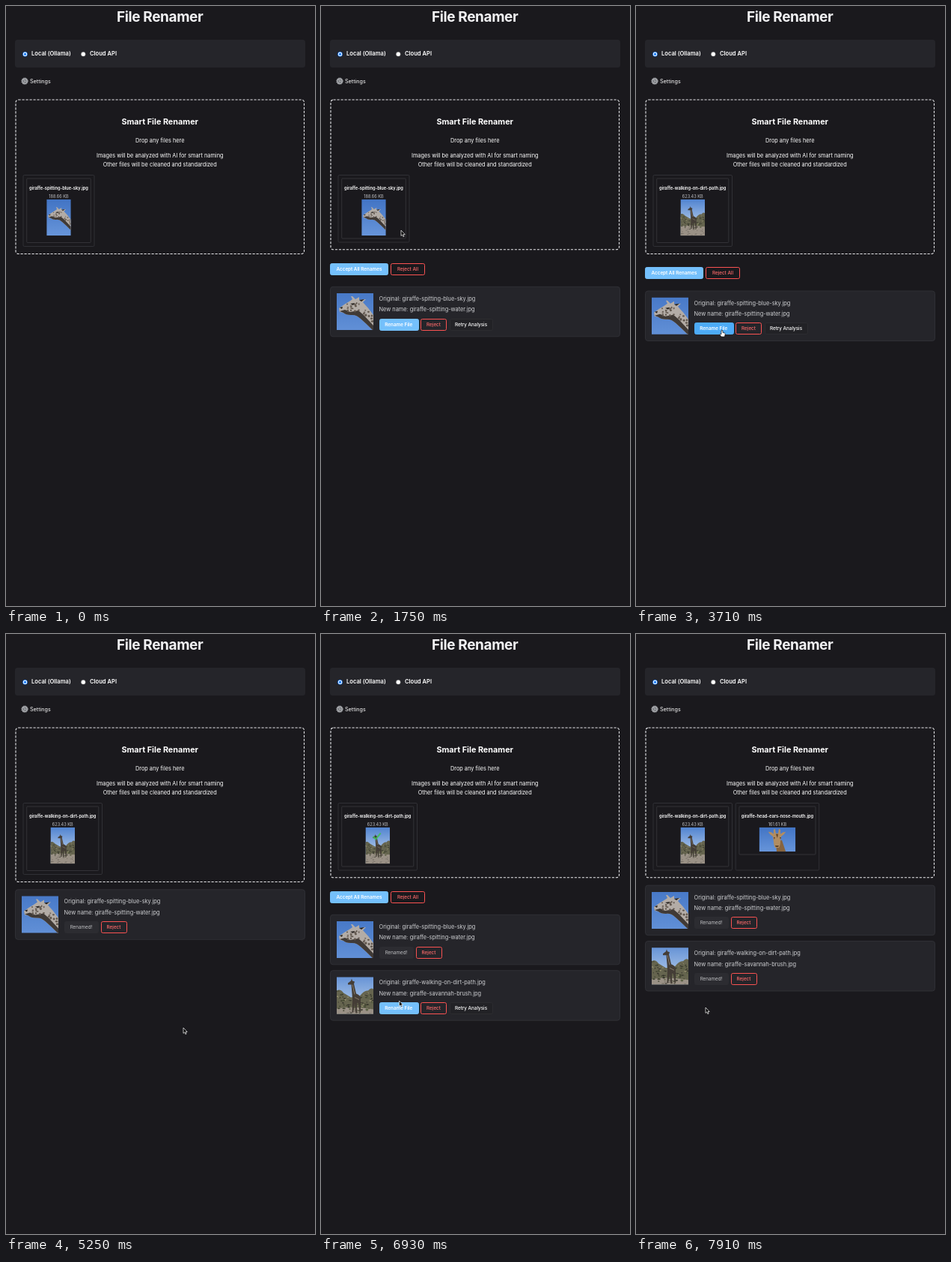
Write an HTML page that moves like this. It is 413 px wide and 800 px high and loops after 8 s.

```html
<!DOCTYPE html>
<html lang="en">
<head>
<meta charset="utf-8">
<title>File Renamer</title>
<style>
  html, body { margin: 0; width: 100%; height: 100%; overflow: hidden; background: #1a191d; }
  svg { display: block; }
  text { font-family: Inter, "Open Sans", sans-serif; }
</style>
</head>
<body>
<svg id="stage" width="100%" height="100%" viewBox="0 0 413 800" preserveAspectRatio="xMinYMin meet">
  <defs>
    <linearGradient id="sky" x1="0" y1="0" x2="0" y2="1">
      <stop offset="0" stop-color="#4274c4"/><stop offset="1" stop-color="#6795da"/>
    </linearGradient>
    <linearGradient id="haze" x1="0" y1="0" x2="0" y2="1">
      <stop offset="0" stop-color="#5083d0"/><stop offset=".55" stop-color="#9dbbe4"/>
    </linearGradient>

    <symbol id="profile" viewBox="0 0 49 73" preserveAspectRatio="xMidYMid slice">
      <rect width="49" height="73" fill="url(#sky)"/>
      <path d="M3 32 L10 27 Q17 23 21 20 L19 16 L21 16 L25 20 L30 17 L30 21 L39 20 L35 24 Q42 31 49 41 V62 Q40 53 32 46 Q26 40 19 41 Q12 41 9 38 L4 37Z" fill="#b3aca6"/>
      <path d="M4 36 L11 34 L18 37 L29 35 L36 41 L49 55 V62 Q40 53 32 46 Q26 40 19 41 Q12 41 9 38Z" fill="#403a36"/>
      <g id="spots" fill="#62584f"></g>
      <path d="M18 26 l6 -1 l-2 3z M4 31 l4 -1 l-1 3z M30 21 l7 -1 l-4 3z" fill="#25211e"/>
    </symbol>

    <symbol id="walker" viewBox="0 0 49 73" preserveAspectRatio="xMidYMid slice">
      <rect width="49" height="73" fill="url(#haze)"/>
      <path d="M0 30 Q5 27 9 33 Q14 36 19 39 L31 37 Q37 29 42 30 Q46 25 49 28 V73 H0Z" fill="#66654f"/>
      <path d="M0 54 Q20 50 49 55 V73 H0Z" fill="#9a9186"/>
      <g id="brush"></g>
      <path d="M15 20 L19 17 L20 14 L21 17 L24 18 L23 21 L26 34 Q32 36 32 41 L32 59 H30.5 L29 47 L27 47 L27 60 H25.5 L24 47 L22 59 H20.5 L21 40 L19.5 22 L15 22Z" fill="#443d36"/>
      <path d="M21 22 L24 35 M24 39 L30 42" stroke="#8d8070" stroke-width=".9" fill="none"/>
    </symbol>

    <symbol id="face" viewBox="0 0 48 32" preserveAspectRatio="xMidYMid slice">
      <rect width="48" height="32" fill="url(#sky)"/>
      <path d="M22 18 L30 17 L35 32 H23Z" fill="#86643f"/>
      <path d="M12 6 Q17 6 19 9 L19 3 L21 2 L22 8 L25 8 L26 2 L28 3 L28 9 Q31 6 35 6 Q33 10 29 12 L28 18 Q28 24 26 27 L21 27 Q19 23 19 18 L18 12 Q14 10 12 6Z" fill="#b18d62"/>
      <path d="M19 13 l2 0 l-1 3z M27 13 l2 0 l-1 3z M21 24 l5 0 l-1 2 l-3 0z M22 9 l3 0 l-1 5z" fill="#5e4328"/>
    </symbol>
  </defs>
  <g id="page"></g>
  <g id="scene"></g>
</svg>
<script>
const LOOP = 8000, STEP = 70;
const RED = '#fa5252', BLUE = '#74c0fc', BLUE_HOVER = '#4dabf7', PANEL = '#25252a';
const $ = id => document.getElementById(id);

const files = [
  { name: 'giraffe-spitting-blue-sky.jpg', next: 'giraffe-spitting-water.jpg', size: '188.66 KB',
    art: 'profile', cardW: 95, w: 32.5, h: 48.5,
    added: 0, done: 420, fade: [1050, 1470], hover: 2310, renamed: 3850, removed: 3570 },
  { name: 'giraffe-walking-on-dirt-path.jpg', next: 'giraffe-savannah-brush.jpg', size: '623.43 KB',
    art: 'walker', cardW: 105.5, w: 32.5, h: 48.5,
    added: 1820, done: 5950, fade: [6860, 7280], hover: 7280, renamed: 7630, removed: Infinity },
  { name: 'giraffe-head-ears-nose-mouth.jpg', size: '161.61 KB',
    art: 'face', cardW: 111.5, w: 48.5, h: 32.5,
    added: 7770, done: Infinity, queued: true, removed: Infinity }
];

// time, x, y of the pointer tip
const path = [
  [1470, -5, 420], [1820, 120, 285], [2170, 112, 447], [2310, 115, 432], [3850, 115, 432],
  [4340, 237, 525], [6440, 237, 525], [6930, 104.5, 489], [7280, 108, 493],
  [7630, 108, 493], [7910, 93, 498]
];

function rect(x, y, w, h, fill, stroke = 'none', r = 2, extra = '') {
  return `<rect x="${x}" y="${y}" width="${w}" height="${h}" rx="${r}" fill="${fill}" stroke="${stroke}" ${extra}/>`;
}
function text(str, x, y, size, fill = '#fff', weight = 400, anchor = 'start', extra = '') {
  return `<text x="${x}" y="${y}" font-size="${size}" fill="${fill}" font-weight="${weight}" text-anchor="${anchor}" ${extra}>${str}</text>`;
}
function circle(x, y, r, fill, extra = '') {
  return `<circle cx="${x}" cy="${y}" r="${r}" fill="${fill}" ${extra}/>`;
}
function photo(art, x, y, w, h) {
  return `<use href="#${art}" x="${x}" y="${y}" width="${w}" height="${h}"/>`;
}
// Outlines sit on half pixels so that they stay crisp.
function button(label, x, y, w, { fill = 'none', stroke = fill, color = '#fff', weight = 500 } = {}) {
  return rect(Math.round(x) + .5, Math.round(y) + .5, Math.round(w) - 1, 15, fill, stroke) +
    text(label, x + w / 2, Math.round(y) + 10.2, 6.3, color, weight, 'middle');
}
const primary = (label, x, y, w, hover) =>
  button(label, x, y, w, { fill: hover ? BLUE_HOVER : BLUE, weight: 600 });
const danger = (label, x, y, w) => button(label, x, y, w, { stroke: RED, color: '#ff6b6b' });

function random(seed) {
  return () => (seed = seed * 16807 % 2147483647) / 2147483647;
}
function dabs(n, seed, place) {
  const rnd = random(seed);
  return Array.from({ length: n }, () => place(rnd)).join('');
}

function drawStatic() {
  $('spots').innerHTML = dabs(28, 77, rnd => {
    const x = 14 + rnd() * 34, top = x < 32 ? 25 : 25 + (x - 32) * 1.1;
    return `<ellipse cx="${x}" cy="${top + rnd() * 11}" rx="${.8 + rnd()}" ry="${.6 + rnd()}"/>`;
  });
  const leaves = ['#3f422f', '#96906f', '#5a6044', '#33322a'];
  $('brush').innerHTML = dabs(110, 31, rnd => {
    const x = rnd() * 49, y = 29 + Math.abs(Math.sin(x / 49 * Math.PI)) * 8 + rnd() * 24;
    return `<ellipse cx="${x}" cy="${y}" rx="${.5 + rnd() * 1.5}" ry=".8" fill="${leaves[rnd() * 4 | 0]}"/>`;
  }) + dabs(30, 53, rnd =>
    `<ellipse cx="${rnd() * 49}" cy="${56 + rnd() * 16}" rx="${1 + rnd() * 2}" ry=".6" fill="#6e685f"/>`);

  $('page').innerHTML =
    text('File Renamer', 205.7, 21, 19, '#f1f1f3', 700, 'middle', 'letter-spacing="-.4"') +
    rect(12, 45, 388, 37, PANEL, 'none', 3.5) +
    circle(25.5, 64.2, 3.2, '#0a75ff') + circle(25.5, 64.2, 2.6, '#fff') + circle(25.5, 64.2, 1.6, '#0a75ff') +
    circle(103.3, 64.2, 2.9, '#fff', 'stroke="#767676" stroke-width=".5"') +
    text('Local (Ollama)', 34, 66, 7.6, '#fff', 600) +
    text('Cloud API', 112, 66, 7.6, '#fff', 600) +
    circle(25, 100.2, 3.6, '#77797d') +
    '<g fill="none" stroke="#b4b6ba">' +
    circle(25, 100.2, 3.3, 'none', 'stroke-width="1.1"') +
    circle(25, 100.2, 4.3, 'none', 'stroke-width="1" stroke-dasharray="1.1 1.15"') +
    '<path d="M25 100.2h3M25 100.2l-1.5 -2.6M25 100.2l-1.5 2.6" stroke-width=".8"/></g>' +
    text('Settings', 32, 103, 7.2) +
    text('Smart File Renamer', 205.7, 158, 10.8, '#fff', 700, 'middle') +
    text('Drop any files here', 205.7, 181.7, 7.35, '#fff', 400, 'middle') +
    text('Images will be analyzed with AI for smart naming', 205.7, 201.5, 7.35, '#fff', 400, 'middle') +
    text('Other files will be cleaned and standardized', 205.7, 214, 7.35, '#fff', 400, 'middle');
}

function checkAlpha(file, t) {
  if (t < file.done || t >= file.fade[1]) return 0;
  return t <= file.fade[0] ? 1 : 1 - .8 * (t - file.fade[0]) / (file.fade[1] - file.fade[0]);
}

function card(file, x, rowH, t) {
  const cx = x + file.cardW / 2;
  const innerH = 31.5 + file.h + (t < file.done && !file.queued ? 5.5 : 0);
  const alpha = checkAlpha(file, t);
  return rect(x, 225.5, file.cardW, rowH, 'none', '#36363b', 1.5, 'stroke-width=".8"') +
    rect(x + 4.7, 230, file.cardW - 9.4, innerH, 'none', '#39393e', 1, 'stroke-width=".8"') +
    text(file.name, cx, 244.6, 5.72, '#fff', 600, 'middle') +
    text(file.size, cx, 256, 5.6, '#c1c2c5', 400, 'middle') +
    photo(file.art, cx - file.w / 2, 257.7, file.w, file.h) +
    (alpha ? `<path d="M${cx - 6} 270l3.5 3.5l6.5 -8" fill="none" stroke="#40c057" stroke-width="2" opacity="${alpha}"/>` : '');
}

function result(file, y, t) {
  const by = y + 42.3;
  return rect(12.5, y, 387, 66.5, PANEL, '#323237', 3.5, 'stroke-width=".9"') +
    photo(file.art, 21, y + 8.8, 49, 49) +
    text('Original: ' + file.name, 77.5, y + 18.5, 7.37, '#cfd0d3') +
    text('New name: ' + file.next, 77.5, y + 33.1, 7.37, '#cfd0d3') +
    (t >= file.renamed
      ? button('Renamed!', 77.5, by, 46, { fill: '#2c2c31', color: '#c1c2c5', weight: 400 }) + danger('Reject', 126.5, by, 35)
      : primary('Rename File', 77.5, by, 52.5, t >= file.hover) + danger('Reject', 133, by, 35) +
        button('Retry Analysis', 171.5, by, 58, { fill: '#222226', stroke: '#2c2c30' }));
}

function pointer(t) {
  if (t < path[0][0]) return '';
  let i = path.findIndex(p => p[0] > t);
  if (i < 0) i = path.length;
  const a = path[i - 1], b = path[i] || a;
  const k = b === a ? 0 : (t - a[0]) / (b[0] - a[0]), e = k * k * (3 - 2 * k);
  const x = a[1] + (b[1] - a[1]) * e, y = a[2] + (b[2] - a[2]) * e;
  const hand = files.some(f => t >= f.hover && t < f.renamed);
  const shape = hand
    ? 'M-1 1Q0 -.6 1 1V3.4L3.6 4.1Q4.4 4.4 4.2 5.6L3.5 9H-1L-3.2 5.8Q-3 4.6 -1 5.8Z'
    : 'M0 0V7.4L1.7 5.9L2.9 8.6L4.1 8.1L3 5.5H5.2Z';
  const [fill, line] = hand ? ['#fff', '#111'] : ['#000', '#fff'];
  return `<path transform="translate(${x} ${y})" d="${shape}" fill="${fill}" stroke="${line}" stroke-width=".7"/>`;
}

function render(t) {
  const cards = files.filter(f => t >= f.added && t < f.removed);
  const results = files.filter(f => t >= f.done);
  const busy = cards.some(f => t < f.done && !f.queued);
  const pending = results.some(f => t < f.renamed);
  const bottom = busy ? 330.5 : 324.8;

  let out = rect(13, 125, 385.5, bottom - 125, 'none', '#e6e6e9', 3.5, 'stroke-width="1.1" stroke-dasharray="3.2 1.8"');
  let x = 23;
  for (const f of cards) {
    out += card(f, x, busy ? 95 : 89.5, t);
    x += f.cardW + 4.7;
  }
  if (pending) {
    out += primary('Accept All Renames', 12, bottom + 17.8, 78) + danger('Reject All', 93, bottom + 17.8, 46);
  }
  const top = bottom + (pending ? 49.5 : 10.3);
  results.forEach((f, i) => out += result(f, top + i * 74.4, t));
  $('scene').innerHTML = out + pointer(t);
}

let last = -1;
function tick(now) {
  const t = Math.floor(now % LOOP / STEP) * STEP;
  if (t !== last) render(last = t);
  requestAnimationFrame(tick);
}
drawStatic();
render(0);
requestAnimationFrame(tick);
</script>
</body>
</html>
```
